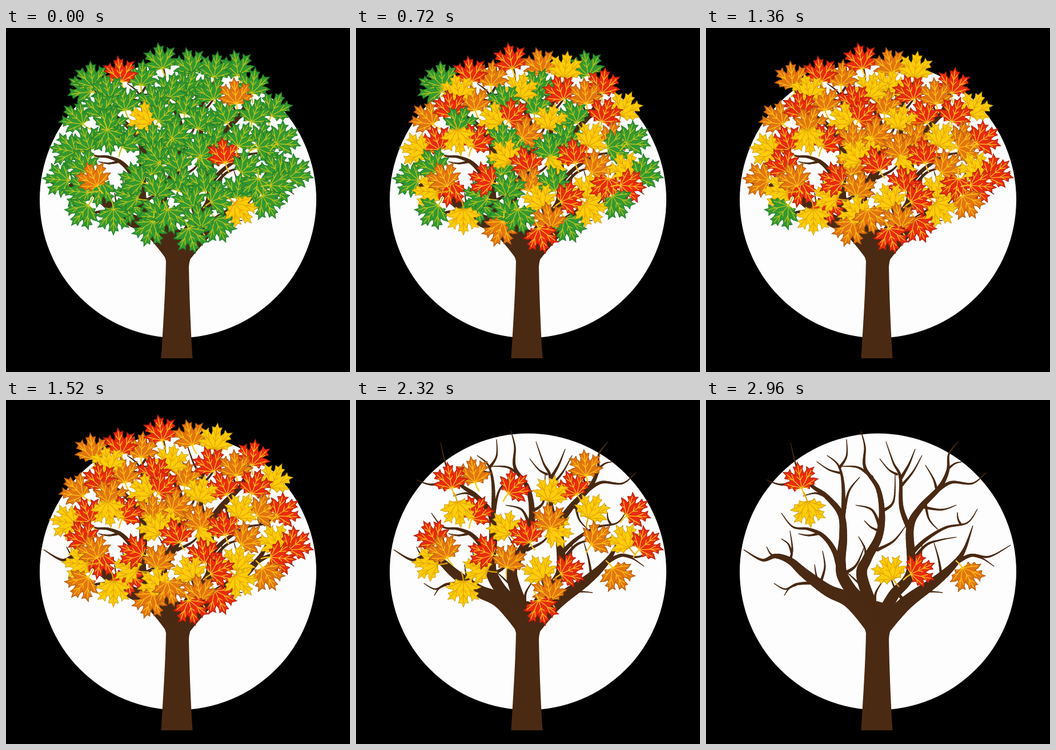
These frames come from a looping animation (602 by 602 pixels, 3.2 s). An HTML page with a canvas:

```html
<!DOCTYPE html>
<html>
<head>
<meta charset="utf-8">
<style>
html, body { margin: 0; width: 100%; height: 100%; overflow: hidden; background: #000; }
canvas { display: block; width: 602px; height: 602px; }
</style>
</head>
<body>
<canvas id="stage" width="602" height="602"></canvas>
<script>
const ctx = document.getElementById('stage').getContext('2d');
const LOOP = 3200;
const steps = [0, 160, 320, 560, 720, 960, 1120, 1360, 1520, 1760, 1920, 2160, 2320, 2560, 2720, 2960];
const BARK = '#4a2a13';

// fill, edge, vein
const paint = {
  g: ['#33992f', '#1d7428', '#c3c51c'],
  r: ['#e92c0d', '#a51b08', '#ffc21a'],
  o: ['#e2750f', '#a6520a', '#ffc414'],
  y: ['#ffcd08', '#c99a08', '#e3a406']
};

// Leaves: colour, x, y, angle, step it turns, step it drops
const crown = [
  ['y', 132, 101, -60, 5, 7], ['o', 150, 83, -6, 5, 9], ['o', 238, 80, 5, 3, 9],
  ['r', 199, 74, -8, 0, 11], ['r', 270, 51, -10, 4, 12], ['o', 321, 59, -14, 3, 11],
  ['o', 403, 63, -10, 6, 7], ['y', 367, 66, 8, 2, 12], ['y', 322, 95, 20, 7, 8],
  ['o', 316, 130, 10, 7, 11], ['y', 290, 102, 12, 1, 11], ['r', 356, 106, -20, 2, 12],
  ['r', 433, 94, 8, 3, 10], ['r', 378, 147, -25, 5, 14], ['o', 401, 112, -5, 0, 13],
  ['y', 472, 135, 25, 4, 11], ['r', 437, 145, 20, 1, 12], ['r', 257, 121, -15, 6, 10],
  ['y', 237, 156, -55, 0, 12], ['r', 281, 149, 45, 3, 15], ['o', 205, 124, -10, 2, 14],
  ['y', 177, 104, -12, 4, 12], ['o', 120, 154, -45, 2, 11]
];
const middle = [
  ['r', 164, 134, -10, 3, 16], ['o', 185, 160, 20, 5, 11], ['y', 290, 194, 10, 5, 11],
  ['o', 257, 189, 0, 7, 9], ['o', 306, 180, 50, 4, 10], ['y', 342, 157, 15, 2, 14],
  ['r', 140, 194, -20, 1, 9], ['r', 213, 191, 30, 4, 13], ['y', 180, 198, 172, 3, 16],
  ['y', 101, 213, -80, 2, 11], ['r', 131, 234, -30, 6, 14], ['o', 255, 236, 0, 7, 8],
  ['y', 257, 219, -35, 1, 14], ['r', 297, 230, -20, 3, 13], ['y', 356, 230, 100, 4, 15],
  ['o', 371, 187, 20, 7, 8], ['o', 338, 204, -8, 5, 14], ['r', 381, 216, -8, 0, 11],
  ['y', 415, 188, 25, 1, 14], ['o', 456, 192, 60, 3, 12], ['o', 460, 206, 80, 7, 8],
  ['r', 490, 191, 55, 6, 14], ['o', 426, 239, 45, 2, 13], ['y', 468, 241, -30, 4, 15],
  ['r', 511, 249, 50, 5, 13]
];
const skirt = [
  ['o', 89, 265, -85, 6, 8], ['r', 163, 289, 190, 3, 11], ['y', 123, 286, -85, 1, 15],
  ['o', 151, 258, -25, 0, 13], ['o', 131, 326, -140, 8, 12], ['r', 214, 319, 170, 6, 10],
  ['y', 211, 292, -70, 7, 13], ['r', 220, 264, -70, 2, 14], ['y', 188, 337, 180, 4, 14],
  ['o', 308, 266, 20, 4, 7], ['r', 345, 265, -10, 5, 11], ['o', 269, 274, 15, 6, 13],
  ['y', 257, 318, -50, 5, 12], ['y', 319, 295, -25, 3, 16], ['o', 250, 358, 200, 2, 10],
  ['o', 288, 337, 165, 6, 11], ['y', 407, 278, 10, 4, 11], ['r', 377, 296, 65, 1, 16],
  ['r', 374, 352, 155, 7, 9], ['o', 337, 329, -12, 2, 14], ['r', 325, 370, 165, 4, 13],
  ['r', 438, 283, 190, 3, 8], ['r', 483, 277, 95, 2, 12], ['o', 459, 311, 150, 5, 16],
  ['y', 413, 322, 140, 0, 11]
];
const leaves = [...crown, ...middle, ...skirt];

// Right half of a maple leaf from the tip down to the stem
const half = [
  [0, -1], [.1, -.75], [.27, -.78], [.21, -.56], [.25, -.32], [.42, -.48], [.46, -.68],
  [.58, -.53], [.86, -.58], [.71, -.38], [.84, -.23], [.61, -.14], [.53, -.02], [.73, -.01],
  [.97, .1], [.74, .2], [.71, .37], [.48, .34], [.42, .55], [.2, .42], [0, .44]
];
const outline = new Path2D();
[...half, ...half.slice(1, -1).reverse().map(([x, y]) => [-x, y])]
  .forEach(([x, y]) => outline.lineTo(x, y));
outline.closePath();

const veins = new Path2D('M0 .44V-.8');
for (const s of [-1, 1]) {
  const vein = (x, y, u, v) => { veins.moveTo(s * x, y); veins.lineTo(s * u, v); };
  vein(0, .44, .68, -.44);
  vein(0, .44, .76, .11);
  vein(0, .44, .36, .46);
  vein(0, -.3, .17, -.6);
  vein(0, 0, .16, -.22);
  vein(.34, 0, .42, -.4);
  vein(.4, -.08, .66, -.2);
  vein(.4, .27, .58, .32);
}
const stem = new Path2D('M0 .44Q.02 .72 .12 .96');

function drawLeaf(kind, x, y, angle) {
  const [fill, edge, vein] = paint[kind];
  ctx.save();
  ctx.translate(x, y);
  ctx.rotate(angle * Math.PI / 180);
  ctx.scale(32, 32);
  ctx.translate(0, .2);
  ctx.strokeStyle = vein;
  ctx.lineWidth = .07;
  ctx.stroke(stem);
  ctx.fillStyle = fill;
  ctx.fill(outline);
  ctx.strokeStyle = edge;
  ctx.lineWidth = .03;
  ctx.stroke(outline);
  ctx.strokeStyle = vein;
  ctx.lineWidth = .04;
  ctx.stroke(veins);
  ctx.restore();
}

// Limbs: base width, then points from base to tip
const limbs = [
  [30, 298, 402, 254, 353, 213, 333, 172, 303, 148, 282, 122, 273, 98, 280, 66, 262],
  [23, 293, 385, 244, 318, 236, 285, 240, 240, 236, 200, 210, 168, 185, 150, 161, 123, 148, 75],
  [22, 300, 385, 273, 310, 282, 278, 302, 240, 308, 200, 301, 155, 278, 118, 278, 82, 271, 54],
  [22, 304, 385, 328, 342, 358, 302, 357, 225, 375, 189, 408, 154, 423, 124, 425, 95, 441, 73],
  [10, 357, 228, 342, 188, 340, 135, 328, 110, 315, 73],
  [30, 305, 402, 349, 356, 402, 317, 433, 289, 452, 262, 467, 220],
  [14, 270, 345, 240, 310, 225, 265, 205, 238, 180, 226, 152, 222, 132, 198],
  [8, 434, 287, 463, 272, 496, 274, 533, 254]
];
const leftTwigs = [
  [8, 240, 205, 240, 150, 232, 115, 212, 97],
  [5, 234, 118, 246, 98, 246, 69],
  [6, 290, 135, 266, 118, 234, 116],
  [6, 241, 200, 250, 160, 269, 135],
  [4, 236, 128, 215, 122, 194, 108],
  [6, 168, 136, 134, 148, 106, 140],
  [5, 212, 170, 192, 163, 170, 168],
  [5, 200, 233, 180, 237, 162, 234],
  [5, 147, 282, 151, 260, 147, 229],
  [4, 150, 268, 144, 252, 132, 243],
  [4, 128, 274, 114, 270, 106, 257],
  [6, 195, 320, 160, 322, 139, 331, 119, 321],
  [4, 158, 323, 146, 329, 137, 342],
  [5, 205, 329, 194, 310, 190, 288],
  [5, 201, 318, 208, 292, 204, 264],
  [6, 304, 220, 290, 192, 262, 184],
  [4, 300, 228, 288, 222, 277, 211],
  [5, 280, 285, 278, 260, 267, 239],
  [7, 238, 305, 262, 290, 278, 255],
  [9, 292, 368, 280, 335, 245, 300]
];
const rightTwigs = [
  [6, 300, 262, 328, 247, 349, 221],
  [6, 307, 195, 328, 178, 331, 130],
  [4, 334, 130, 320, 122, 304, 103],
  [6, 341, 137, 355, 113, 366, 86],
  [5, 342, 150, 362, 126, 378, 97],
  [4, 424, 120, 436, 111, 449, 108],
  [7, 405, 158, 430, 144, 466, 146, 490, 127],
  [5, 404, 158, 398, 138, 384, 114],
  [5, 378, 187, 412, 192, 438, 184],
  [5, 384, 180, 390, 208, 406, 227],
  [8, 360, 268, 385, 244, 420, 223, 457, 215, 475, 191],
  [4, 446, 218, 441, 208, 440, 197],
  [6, 362, 280, 385, 254, 410, 245, 438, 240],
  [5, 412, 308, 407, 278, 399, 250],
  [5, 360, 300, 375, 280, 378, 250],
  [4, 468, 272, 485, 278, 504, 291],
  [5, 362, 346, 388, 336, 414, 337],
  [7, 348, 354, 332, 332, 322, 308],
  [6, 296, 362, 297, 338, 310, 316]
];

// Tapered Catmull-Rom curve
function drawLimb([width, ...flat]) {
  const pts = [];
  for (let i = 0; i < flat.length; i += 2) pts.push([flat[i], flat[i + 1]]);
  const n = pts.length - 1, total = n * 12;
  const at = i => pts[Math.max(0, Math.min(n, i))];
  const point = k => {
    const i = Math.min(n - 1, Math.floor(k / 12)), t = k / 12 - i;
    return [0, 1].map(c => {
      const [a, b, d, e] = [at(i - 1)[c], at(i)[c], at(i + 1)[c], at(i + 2)[c]];
      return b + t / 2 * (d - a + t * (2 * a - 5 * b + 4 * d - e + t * (3 * (b - d) + e - a)));
    });
  };
  for (let k = 0; k < total; k++) {
    ctx.lineWidth = 1 + (width - 1) * (1 - k / total) ** 1.15;
    ctx.beginPath();
    ctx.moveTo(...point(k));
    ctx.lineTo(...point(k + 1));
    ctx.stroke();
  }
}

const trunk = new Path2D('M271.5 578C275 520 279 460 280 408C277 394 268 382 256 368L300 352L345 366C331 382 321 400 320 418C321 470 323 525 326.5 578Z');

function draw(step) {
  ctx.fillStyle = '#000';
  ctx.fillRect(0, 0, 602, 602);
  ctx.fillStyle = '#fdfdfd';
  ctx.beginPath();
  ctx.arc(301, 300.5, 242, 0, 7);
  ctx.fill();
  ctx.fillStyle = ctx.strokeStyle = BARK;
  ctx.lineCap = 'round';
  ctx.fill(trunk);
  [...limbs, ...leftTwigs, ...rightTwigs].forEach(drawLimb);
  ctx.lineCap = 'butt';
  for (const [kind, x, y, angle, turn, drop] of leaves) {
    if (step < drop) drawLeaf(step < turn ? 'g' : kind, x, y, angle);
  }
}

let shown = -1;
function tick(now) {
  const t = now % LOOP;
  const step = steps.filter(s => s <= t).length - 1;
  if (step !== shown) draw(shown = step);
  requestAnimationFrame(tick);
}
tick(0);
</script>
</body>
</html>
```
